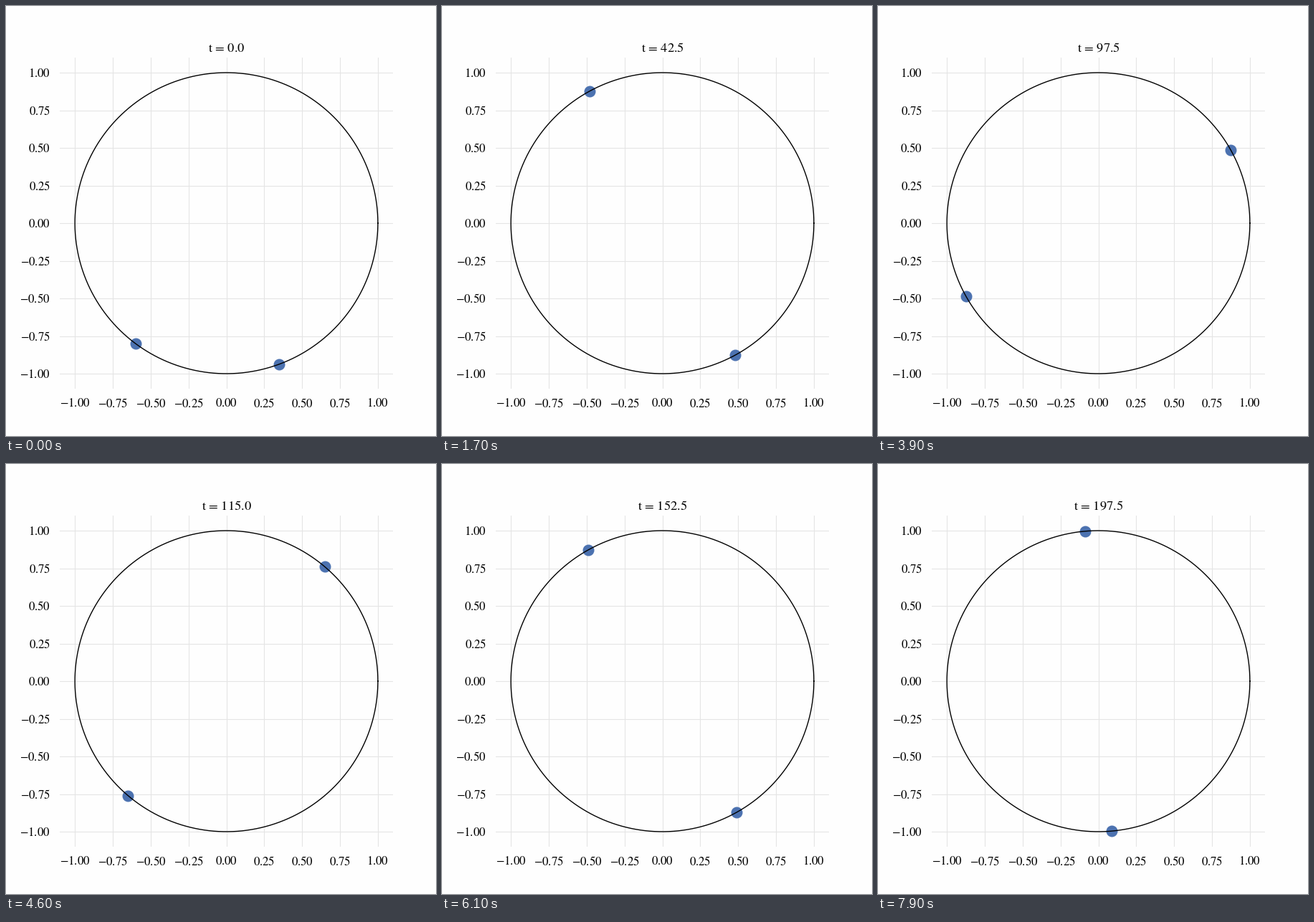
Animation of 600 by 600 pixels, one loop 8000 ms. Source, as a matplotlib script:

```python
import numpy as np
import matplotlib.pyplot as plt
from matplotlib.animation import FuncAnimation

FRAMES, INTERVAL = 80, 100
DT = 2.5            # simulated time per frame
OMEGA = 0.2         # shared natural frequency
REPULSION = 0.4     # coupling that drives the phases apart
MEAN0, GAP0 = 4.5684, 1.0

plt.rcParams.update({
    "font.family": "Liberation Serif",
    "mathtext.fontset": "stix",
    "axes.titlesize": 13.2,
    "xtick.labelsize": 12.1,
    "ytick.labelsize": 12.1,
})


def phases(t):
    """Exact phases of two identical, mutually repelling oscillators."""
    half = np.arctan(np.tan(GAP0 / 2) * np.exp(REPULSION * t))
    return MEAN0 + OMEGA * t + np.array([-half, half])


def on_circle(angle):
    return np.column_stack([np.cos(angle), np.sin(angle)])


def title_text(t):
    gap = r"\hspace{0.146}"
    return rf"$\mathrm{{t}}{gap}={gap}{t:.1f}$"


fig, ax = plt.subplots(figsize=(6, 6), dpi=100, facecolor="#fefefe")
ax.set_facecolor("#fefefe")
ax.set(xlim=(-1.1, 1.1), ylim=(-1.1, 1.1))

ticks = np.linspace(-1, 1, 9)
labels = [f"${v:.2f}$" for v in ticks]
ax.set_xticks(ticks, labels)
ax.set_yticks(ticks, labels)
ax.tick_params(length=0, pad=9.5)
ax.set_axisbelow(True)
ax.grid(color="#e5e5e5", linewidth=0.8)
ax.spines[:].set_visible(False)

ax.plot(*on_circle(np.linspace(0, 2 * np.pi, 400)).T, color="black", lw=1)
dots = ax.scatter([0, 0], [0, 0], s=100, color="#4c72b0", linewidths=1.5)
title = ax.set_title(title_text(0))


def update(frame):
    t = frame * DT
    dots.set_offsets(on_circle(phases(t)))
    title.set_text(title_text(t))
    return dots, title


anim = FuncAnimation(fig, update, frames=FRAMES, interval=INTERVAL,
                     repeat=True, repeat_delay=0)
plt.show()
```
